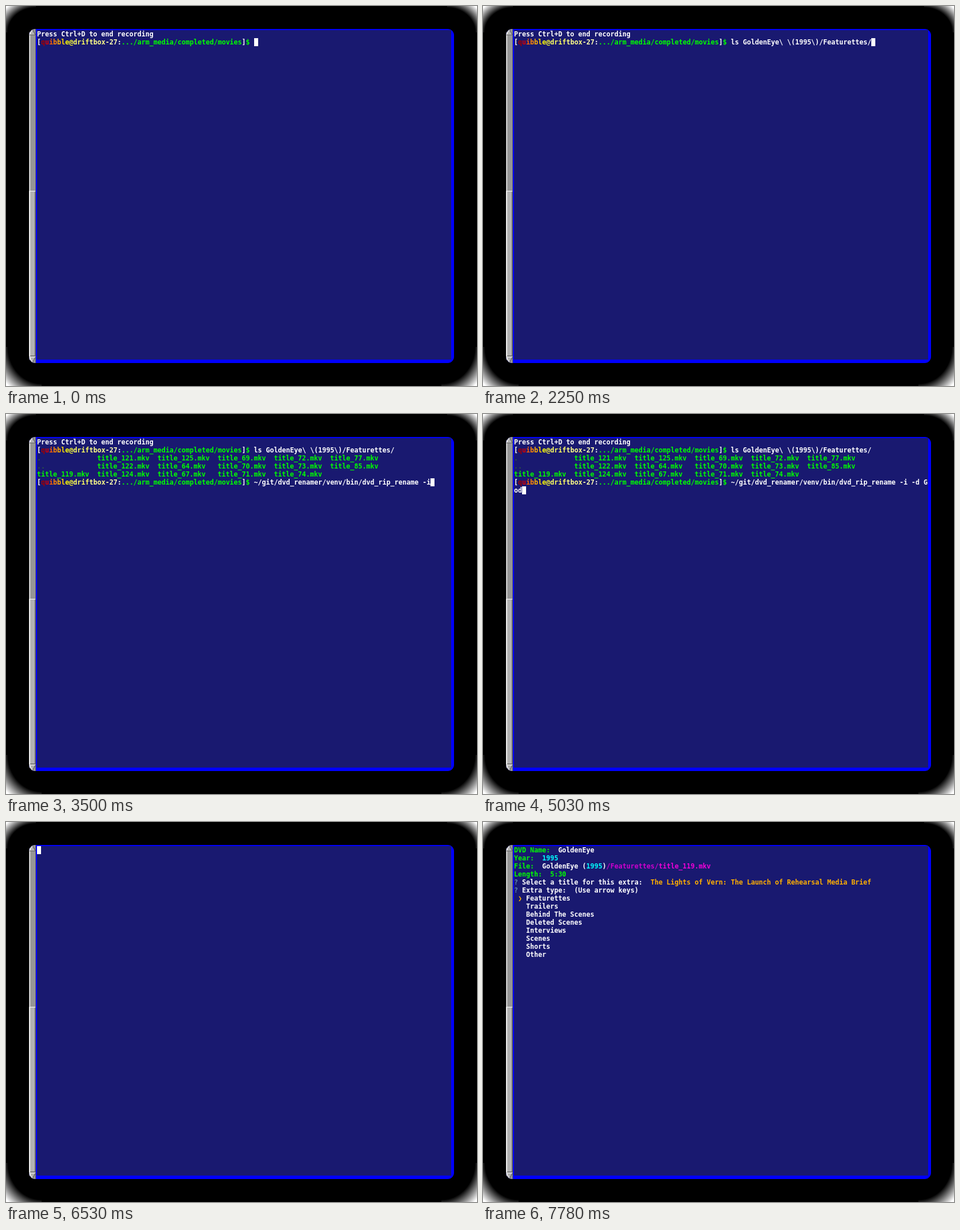
An HTML page for the animation above (8000 ms loop, 820 px wide and 662 px high).

```html
<!DOCTYPE html>
<html lang="en">
<head>
<meta charset="utf-8">
<title>Terminal session</title>
<style>
  html, body { margin: 0; width: 100%; height: 100%; overflow: hidden; }
  body {
    --fade: #000 94%, #fff 136%;
    position: relative;
    background:
      radial-gradient(52px 46px at 100% 100%, var(--fade)) 0 0 / 52px 46px,
      radial-gradient(52px 46px at 0 100%, var(--fade)) 100% 0 / 52px 46px,
      radial-gradient(62px 68px at 100% 0, var(--fade)) 0 100% / 62px 68px,
      radial-gradient(62px 68px at 0 0, var(--fade)) 100% 100% / 62px 68px,
      #000;
    background-repeat: no-repeat;
  }
  svg { position: absolute; left: 0; top: 0; }
  pre {
    position: absolute; left: 54px; top: 42px; margin: 0;
    font: bold 11.627px/14px "DejaVu Sans Mono", monospace;
    color: #fff;
  }
  .cursor {
    display: inline-block; width: 7px; height: 14px;
    vertical-align: top; background: #fff;
  }
</style>
</head>
<body>
<svg width="820" height="662" shape-rendering="crispEdges">
  <clipPath id="window"><rect x="40" y="40" width="740" height="582" rx="11"/></clipPath>
  <g clip-path="url(#window)">
    <rect x="40" y="40" width="740" height="582" fill="#00f"/>
    <rect x="54" y="42" width="721" height="574" fill="#191970"/>
    <!-- scrollbar: trough, thumb, arrows -->
    <rect x="40" y="40" width="12" height="582" fill="#969696"/>
    <rect x="42" y="322" width="8" height="288" fill="#b2b2b2"/>
    <path d="M41 40V622M41 322.5H51" stroke="#fff" fill="none"/>
    <path d="M40.5 322V610" stroke="#e0e0e0"/>
    <path d="M51.5 40V622M50.5 324V610M42 609.5H51M41 50.5H51" stroke="#646464" fill="none"/>
    <g shape-rendering="auto">
      <path d="M46 41L51 50H41Z" fill="#b2b2b2"/>
      <path d="M46 41L41 50" stroke="#fff"/>
      <path d="M46 41L51 50" stroke="#505050"/>
      <path d="M41 612H51L46 621Z" fill="#b2b2b2"/>
      <path d="M51 611.5H41L46 621" stroke="#fff" fill="none"/>
      <path d="M51 612L46 621" stroke="#505050"/>
    </g>
  </g>
</svg>
<pre id="screen"></pre>
<script>
const LOOP = 8000;
const screenEl = document.getElementById("screen");
const paint = (color, text) => `<span style="color:${color}">${text}</span>`;
const green = text => paint("#0f0", text);
const cyan = text => paint("#0ff", text);
const orange = text => paint("#ffaf00", text);
const CURSOR = '<span class="cursor"></span>';

const userColors = ["#a00000", "#d70000", "#ff5f00", "#ff8700", "#ffaf00", "#ffd700", "#ffff00"];
const prompt = "[" + [..."quibble"].map((ch, i) => paint(userColors[i], ch)).join("") +
  paint("#ffff2f", "@") + paint("#ffff5f", "drif") + paint("#ffff87", "tbox") +
  paint("#ffffaf", "-27") + ":" + green(".../arm_media/completed/movies") + "]" + green("$") + " ";

const folder = String.raw`GoldenEye\ \(1995\)/`;
const listCommand = "ls " + folder + "Featurettes/";
const columns = [[121, 122, 124], [125, 64, 67], [69, 70, 71], [72, 73, 74], [77, 85]];
const listing = [".", "..", green("title_119.mkv")].map((first, row) => {
  const lead = row < 2 ? paint("#2c5a40", first) + " ".repeat(15 - first.length) : first + "  ";
  const cells = columns.filter(col => col[row]).map((col, i) =>
    `title_${col[row]}.mkv`.padEnd(i < 2 ? 15 : 14));
  return lead + green(cells.join(""));
}).join("\n");

const firstLine = "Press Ctrl+D to end recording\n" + prompt;
const typeList = text => firstLine + text + CURSOR;
const secondLine = firstLine + listCommand + "\n" + listing + "\n" + prompt;
const typeRename = text => secondLine + text + CURSOR;
const tool = "~/git/dvd_renamer/venv/bin/dvd_rip_rename ";
const renameStart = tool + "-i -d G\n";

const ask = text => paint("#5f87af", "?") + " " + text + "  ";
const HINT = "(Use arrow keys)";
const choose = ([first, ...rest]) =>
  HINT + "\n " + orange("❯") + " " + [first, ...rest].join("\n   ");
const disc = "318 - GoldenEye (Blu-ray)(1995)";
const extra = "The Lights of Vern: The Launch of Rehearsal Media Brief";
const askDisc = ask("Which Title?");
const askExtra = [
  green("DVD Name:") + "  GoldenEye",
  green("Year:") + "  " + cyan("1995"),
  green("File:") + "  GoldenEye (" + cyan("1995") + ")" +
    paint("#cd00cd", "/Featurettes/") + paint("#f000d8", "title_119.mkv"),
  green("Length:  5:30"),
  ask("Select a title for this extra:")
].join("\n");
const extraTypes = ["Featurettes", "Trailers", "Behind The Scenes", "Deleted Scenes",
  "Interviews", "Scenes", "Shorts", "Other"];

// [start time in ms, screen contents]
const steps = [
  [0, typeList("")],
  [250, typeList("l")],
  [500, typeList("ls")],
  [750, typeList("ls ")],
  [1000, typeList("ls G")],
  [1250, typeList("ls Go")],
  [1500, typeList("ls Gol")],
  [1750, typeList("ls " + folder)],
  [2000, typeList("ls " + folder + "F")],
  [2250, typeList(listCommand)],
  [2500, typeRename("")],
  [2750, typeRename("~/git/")],
  [3000, typeRename("~/git/dvd_renamer/")],
  [3250, typeRename(tool)],
  [3500, typeRename(tool + "-i")],
  [3750, typeRename(tool + "-i ")],
  [4000, typeRename(tool + "-i -")],
  [4250, typeRename(tool + "-i -d ")],
  [4520, typeRename(renameStart)],
  [4770, typeRename(renameStart + "o")],
  [5030, typeRename(renameStart + "od")],
  [5280, typeRename(renameStart + "o")],
  [5530, typeRename(renameStart + "ol")],
  [5780, typeRename(renameStart + folder.slice(1))],
  [6030, typeRename(renameStart + folder.slice(1) + "\n")],
  [6530, CURSOR],
  [6780, askDisc + choose([disc])],
  [7280, askDisc + orange(disc) + "\n" + CURSOR],
  [7530, askExtra + choose([extra])],
  [7780, askExtra + orange(extra) + "\n" + ask("Extra type:") + choose(extraTypes)]
];

let shown;
function draw() {
  const time = performance.now() % LOOP;
  const step = steps.filter(([start]) => start <= time).pop();
  if (step !== shown) {
    shown = step;
    screenEl.innerHTML = step[1];
  }
  requestAnimationFrame(draw);
}
draw();
</script>
</body>
</html>
```
